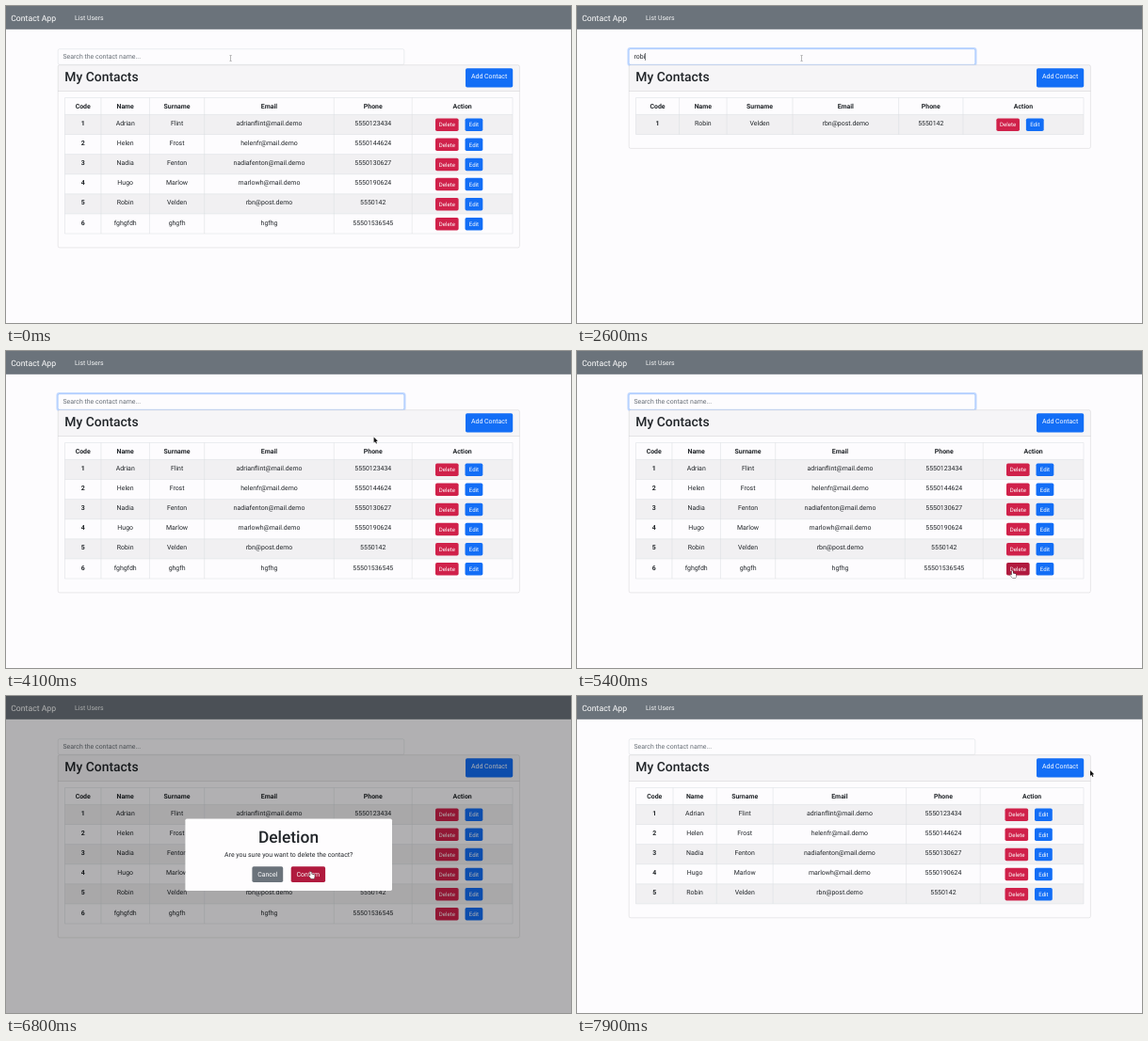
An HTML page with a canvas for the animation above (8000 ms loop, 600 px wide and 337 px high).

```html
<!DOCTYPE html>
<html lang="en">
<head>
<meta charset="utf-8">
<title>Contact App</title>
<style>
html, body { margin: 0; width: 100%; height: 100%; overflow: hidden; background: #fdfcfe; }
canvas { display: block; width: 600px; height: 337px; }
</style>
</head>
<body>
<canvas id="stage"></canvas>
<script>
const W = 600, H = 337, LOOP = 8000, STEP = 100;
const REM = 6.95, LINE = 0.5, RADIUS = REM / 4;
const PAPER = '#fdfcfe', INK = '#212529', GREY = '#6b737b';
const BLUE = '#136ef6', RED = '#d0214a', DARK_RED = '#b01a3e';

const canvas = document.getElementById('stage');
const ctx = canvas.getContext('2d');
const dpr = window.devicePixelRatio || 1;
canvas.width = W * dpr;
canvas.height = H * dpr;

const heads = ['Code', 'Name', 'Surname', 'Email', 'Phone', 'Action'];
const contacts = [
  ['Adrian', 'Flint', 'adrianflint@mail.demo', '5550123434'],
  ['Helen', 'Frost', 'helenfr@mail.demo', '5550144624'],
  ['Nadia', 'Fenton', 'nadiafenton@mail.demo', '5550130627'],
  ['Hugo', 'Marlow', 'marlowh@mail.demo', '5550190624'],
  ['Robin', 'Velden', 'rbn@post.demo', '5550142'],
  ['fghgfdh', 'ghgfh', 'hgfhg', '55501536545']
];

const LEFT = 62.5, RIGHT = 538, TOP = 97.5, BODY = 115.4, ROW = 21.1;
const DELETE_W = 24.6, EDIT_W = 18.8, SMALL_H = 13.5, GAP = 6.9;
const CONFIRM = { x: 302.7, y: 181.3, w: 36.4, h: 16.8 };

const query = 'robi';
const keyTimes = [1000, 1200, 1300, 1600];
const CLICK = 300, CLEAR = 3300, HOVER = 5000, OPEN = 5500, CLOSE = 6900, REMOVED = 7100;

const home = { x: 238.6, y: 55.5 };
const moves = [
  { from: 4000, to: 4100, x: 390.6, y: 91.5 },
  { from: 4100, to: 4500, x: 470, y: 286 },
  { from: 4500, to: HOVER, x: 462.3, y: 234 },
  { from: OPEN, to: 6200, x: 323.8, y: 187 },
  { from: 7600, to: 7900, x: 545, y: 79 }
];

const clamp = v => Math.max(0, Math.min(1, v));
const smooth = v => v * v * (3 - 2 * v);
const inside = (p, b) => p.x >= b.x && p.x <= b.x + b.w && p.y >= b.y && p.y <= b.y + b.h;

function pointerAt(t) {
  return moves.reduce((p, m) => {
    const k = smooth(clamp((t - m.from) / (m.to - m.from)));
    return { x: p.x + (m.x - p.x) * k, y: p.y + (m.y - p.y) * k };
  }, home);
}

function setFont(size = REM, weight = 400) {
  ctx.font = `${weight} ${size}px Roboto, Arial, sans-serif`;
}

function textWidth(str, weight) {
  setFont(REM, weight);
  return ctx.measureText(str).width;
}

function text(str, x, y, { size, weight, color = INK, align = 'center' } = {}) {
  setFont(size, weight);
  ctx.textAlign = align;
  ctx.fillStyle = color;
  ctx.fillText(str, x, y);
}

function box(x, y, w, h, r, fill, stroke, width = LINE) {
  ctx.beginPath();
  ctx.roundRect(x, y, w, h, r);
  if (fill) { ctx.fillStyle = fill; ctx.fill(); }
  if (stroke) { ctx.strokeStyle = stroke; ctx.lineWidth = width; ctx.stroke(); }
}

function line(x1, y1, x2, y2, color) {
  ctx.beginPath();
  ctx.moveTo(x1, y1);
  ctx.lineTo(x2, y2);
  ctx.strokeStyle = color;
  ctx.lineWidth = LINE;
  ctx.stroke();
}

function button(label, { x, y, w, h }, fill, size, baseline) {
  box(x, y, w, h, RADIUS, fill);
  text(label, x + w / 2, baseline, { size, color: '#fff' });
}

function drawNav() {
  ctx.fillStyle = GREY;
  ctx.fillRect(0, 0, W, 24.8);
  text('Contact App', 5.2, 15.5, { size: REM * 1.25, color: '#fff', align: 'left' });
  text('List Users', 73, 14.7, { color: '#f4f5f6', align: 'left' });
}

function drawSearch(typed, focus, caret) {
  if (focus > 0) box(53.5, 44, 371, 20, 3, `rgba(13,110,253,${0.25 * focus})`);
  box(55.2, 45.7, 367.6, 16.6, RADIUS, PAPER, focus > 0.5 ? '#86b7fe' : '#d8dce1');
  if (typed) text(typed, 60.5, 56.3, { align: 'left' });
  else text('Search the contact name...', 60.5, 56.3, { color: '#666d75', align: 'left' });
  if (caret) {
    ctx.fillStyle = INK;
    ctx.fillRect(60.6 + textWidth(typed), 50, 0.6, 7.8);
  }
}

function drawCard(bottom) {
  const edge = 'rgba(0,0,0,.17)';
  box(55.2, 62.7, 490.2, bottom - 62.7, RADIUS, PAPER);
  box(55.2, 62.7, 490.2, 27.8, [RADIUS, RADIUS, 0, 0], '#f6f5f7');
  line(55.2, 90.5, 545.4, 90.5, edge);
  box(55.2, 62.7, 490.2, bottom - 62.7, RADIUS, null, edge);
  text('My Contacts', 62.3, 79.6, { size: REM * 2, weight: 500, align: 'left' });
  button('Add Contact', { x: 488, y: 66.3, w: 50.2, h: 20.3 }, BLUE, REM, 76.8);
}

// Automatic table layout: spare width is shared in proportion to content.
function columnEdges(rows) {
  const buttons = DELETE_W + EDIT_W + GAP * 2;
  const widths = heads.map((head, i) => {
    const cells = i ? rows.map(row => textWidth(row[i - 1] || '')) : [];
    return REM + Math.max(textWidth(head, 700), ...cells, i === 5 ? buttons : 0);
  });
  const scale = (RIGHT - LEFT) / widths.reduce((a, b) => a + b);
  let x = LEFT;
  return [x, ...widths.map(w => x += w * scale)];
}

function drawTable(rows, p, t) {
  const cols = columnEdges(rows);
  const mid = i => (cols[i] + cols[i + 1]) / 2;
  const rowTop = r => BODY + ROW * r;
  const rule = '#d9dce0';
  const modal = t >= OPEN && t < CLOSE;

  rows.forEach((_, r) => {
    if (r % 2) return;
    ctx.fillStyle = '#f1f0f2';
    ctx.fillRect(LEFT, rowTop(r), RIGHT - LEFT, ROW);
  });
  line(LEFT, TOP, RIGHT, TOP, rule);
  for (let r = 0; r <= rows.length; r++) line(LEFT, rowTop(r), RIGHT, rowTop(r), rule);
  cols.forEach(x => line(x, TOP, x, rowTop(rows.length), rule));

  heads.forEach((head, i) => text(head, mid(i), 108.9, { weight: 700 }));
  rows.forEach((row, r) => {
    const y = rowTop(r), base = y + 11.6;
    text(r + 1, mid(0), base, { weight: 700 });
    row.forEach((cell, i) => text(cell, mid(i + 1), base));

    const del = { x: mid(5) - 28.6, y: y + 4.1, w: DELETE_W, h: SMALL_H };
    const edit = { ...del, x: del.x + DELETE_W + GAP, w: EDIT_W };
    const pressed = t === OPEN && r === 5;
    const hot = pressed || (!modal && inside(p, del));
    button('Delete', del, hot ? DARK_RED : RED, REM * 0.875, y + 13);
    if (pressed) box(del.x, del.y, del.w, del.h, RADIUS, null, '#111', 0.9);
    button('Edit', edit, BLUE, REM * 0.875, y + 13);
  });
}

function drawModal(p) {
  ctx.fillStyle = 'rgba(0,0,0,.3)';
  ctx.fillRect(0, 0, W, H);
  box(190.4, 130.5, 219.6, 76.5, RADIUS, '#fefdfe');
  text('Deletion', 300, 155.5, { size: REM * 2.5, weight: 500 });
  text('Are you sure you want to delete the contact?', 300.2, 171.2);
  button('Cancel', { ...CONFIRM, x: 261.4, w: 32.8 }, GREY, REM, 192);
  button('Confirm', CONFIRM, inside(p, CONFIRM) ? DARK_RED : RED, REM, 192);
}

function shape(points, fill, stroke) {
  ctx.beginPath();
  points.forEach(([x, y]) => ctx.lineTo(x, y));
  ctx.closePath();
  ctx.lineJoin = 'round';
  ctx.lineWidth = 0.8;
  ctx.strokeStyle = stroke;
  ctx.stroke();
  ctx.fillStyle = fill;
  ctx.fill();
}

function drawPointer(p, kind) {
  ctx.save();
  ctx.translate(p.x, p.y);
  if (kind === 'beam') {
    ctx.fillStyle = '#888';
    ctx.fillRect(-0.3, -2.9, 0.6, 5.8);
    for (const y of [-3.1, 2.6]) ctx.fillRect(-1.2, y, 2.4, 0.5);
  } else if (kind === 'hand') {
    shape([[-0.6, 0], [0.6, 0], [0.8, 2.4], [3.6, 3], [4, 4], [3.5, 7.2],
      [0.2, 7.2], [-2.2, 4.2], [-1.6, 3.6], [-0.6, 4.4]], '#fff', '#222');
  } else {
    shape([[0, 0], [0, 5.9], [1.4, 4.7], [2.4, 7], [3.4, 6.6], [2.4, 4.4], [4.2, 4.3]], '#111', '#fff');
  }
  ctx.restore();
}

function pointerKind(t, p) {
  if (t < moves[0].to) return 'beam';
  const onDelete = t >= HOVER && t <= OPEN;
  const onConfirm = t > OPEN && t < CLOSE && inside(p, CONFIRM);
  return onDelete || onConfirm ? 'hand' : 'arrow';
}

// The caret blinks twice a second and restarts at each key press.
function caretOn(t, focus) {
  if (!focus || t >= HOVER) return false;
  const start = [0, CLICK, ...keyTimes, CLEAR].filter(k => k <= t).pop();
  return Math.floor((t - start) / 500) % 2 === 0;
}

function draw(t) {
  const p = pointerAt(t);
  const typed = t < CLEAR ? query.slice(0, keyTimes.filter(k => k <= t).length) : '';
  const focus = t <= OPEN ? clamp((t - CLICK + STEP) / 200) : 0;
  const kept = t < REMOVED ? contacts : contacts.slice(0, -1);
  const rows = kept.filter(([name]) => name.toLowerCase().startsWith(typed));

  ctx.setTransform(dpr, 0, 0, dpr, 0, 0);
  ctx.textRendering = 'geometricPrecision';
  ctx.fillStyle = PAPER;
  ctx.fillRect(0, 0, W, H);
  drawNav();
  drawSearch(typed, focus, caretOn(t, focus));
  drawCard(BODY + ROW * rows.length + 14.9);
  drawTable(rows, p, t);
  if (t >= OPEN && t < CLOSE) drawModal(p);
  drawPointer(p, pointerKind(t, p));
}

const begin = performance.now();
function tick() {
  const t = (performance.now() - begin) % LOOP;
  draw(Math.floor(t / STEP) * STEP);
  requestAnimationFrame(tick);
}
tick();
</script>
</body>
</html>
```
